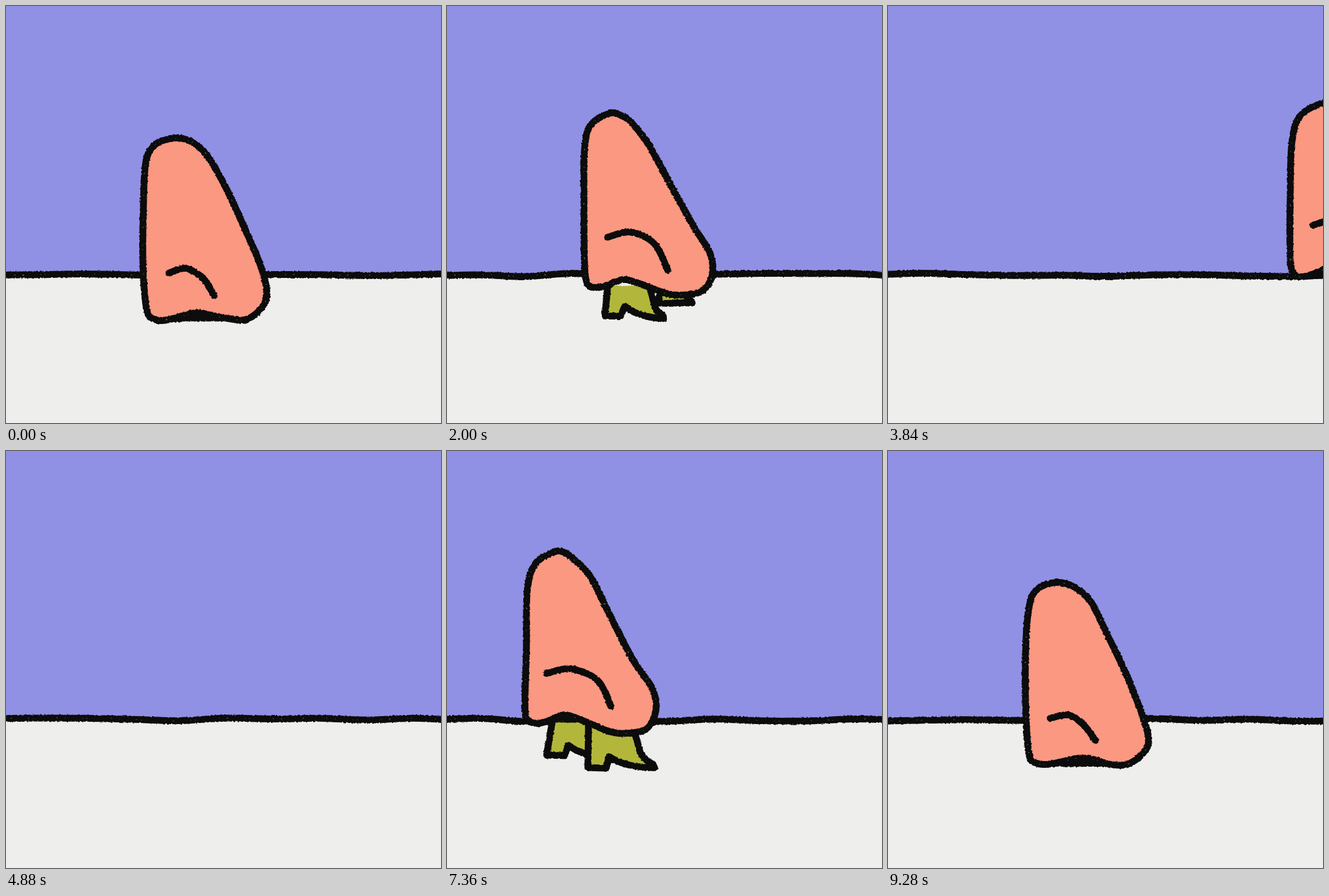
These frames come from a looping animation (764x733 px, 9360 ms). An HTML page:

```html
<!DOCTYPE html>
<html lang="en">
<head>
<meta charset="utf-8">
<title>Walking nose</title>
<style>
  html, body { margin: 0; width: 100%; height: 100%; overflow: hidden; background: #eeeeec; }
  svg { display: block; width: 100%; height: 100%; }
  .ink { stroke: #0c0c0c; stroke-width: 12; stroke-linecap: round; stroke-linejoin: round; fill: none; }
  .boot { fill: #b2b73c; }
  .skin { fill: #fb9881; }
  .speck { fill: none; stroke: #77777c; stroke-width: 1.2; stroke-dasharray: 1 13 2 29 1 7 1 41; }
</style>
</head>
<body>
<svg viewBox="0 0 764 733">
  <defs>
    <filter id="chalk" filterUnits="userSpaceOnUse" x="-20" y="150" width="804" height="430" color-interpolation-filters="sRGB">
      <feTurbulence id="noise" type="fractalNoise" baseFrequency="0.3" numOctaves="1" result="n"/>
      <feDisplacementMap in="SourceGraphic" in2="n" scale="4" xChannelSelector="R" yChannelSelector="G"/>
    </filter>
  </defs>
  <rect width="764" height="733" fill="#eeeeec"/>
  <path id="sky" fill="#9091e4"/>
  <g filter="url(#chalk)">
    <path id="ground" class="ink"/>
    <path id="groundSpeck" class="speck"/>
    <g id="walker">
      <path id="farBoot" class="ink boot"/>
      <path id="nearBoot" class="ink boot"/>
      <path id="nose" class="ink skin"/>
      <path id="noseSpeck" class="speck"/>
      <path id="nostril" class="ink" stroke-width="11"/>
    </g>
  </g>
</svg>
<script>
const LOOP = 9360, STEP = 80;
const LEAVE = 2400, AWAY = 5000, ARRIVE = 7680, SPEED = 0.323, STRIDE = 960;

// Outlines of the nose when seated and when standing, point for point.
const SIT = [[297,231],[262,244],[246,275],[241,350],[242,460],[247,535],[262,550],[285,552],[312,543],[337,538],
  [362,544],[387,550],[420,550],[447,533],[457,505],[446,457],[417,388],[385,320],[356,266],[329,239]];
const STAND = [[292,181],[257,203],[245,250],[242,350],[241,450],[246,478],[261,484],[281,479],[312,470],[355,483],
  [385,497],[415,502],[453,492],[470,460],[463,420],[432,372],[390,295],[355,228],[325,193],[309,184]];
const SIT_CURVE = [[287,468],[318,463],[345,480],[364,508]];
const STAND_CURVE = [[280,394],[322,387],[367,408],[393,455]];

const el = id => document.getElementById(id);
const set = (id, name, value) => el(id).setAttribute(name, value);
const lerp = (a, b, k) => a + (b - a) * k;
const ramp = (t, from, to) => Math.min(1, Math.max(0, (t - from) / (to - from)));
const smooth = p => p * p * (3 - 2 * p);
const fix = p => p.map(v => v.toFixed(1)).join(' ');

function random(seed) {
  let s = (seed + 1) * 2654435761 >>> 0;
  return () => {
    s = (s + 0x6D2B79F5) >>> 0;
    let r = Math.imul(s ^ s >>> 15, s | 1);
    r ^= r + Math.imul(r ^ r >>> 7, r | 61);
    return ((r ^ r >>> 14) >>> 0) / 4294967296;
  };
}

// Catmull-Rom spline through the points.
function spline(pts, closed) {
  const n = pts.length;
  const at = i => closed ? pts[(i + n) % n] : pts[Math.min(n - 1, Math.max(0, i))];
  const handle = (p, a, b, sign) => [p[0] + sign * (b[0] - a[0]) / 6, p[1] + sign * (b[1] - a[1]) / 6];
  let d = 'M' + fix(pts[0]);
  for (let i = 0; i < (closed ? n : n - 1); i++) {
    const a = at(i), b = at(i + 1);
    d += 'C' + [handle(a, at(i - 1), b, 1), handle(b, a, at(i + 2), -1), b].map(fix).join(' ');
  }
  return closed ? d + 'Z' : d;
}

// Heel at (x, y); lean is -1 for a trailing foot and 1 for a leading one.
function boot({ x, y, size, arch, lean, tilt, ankle }, shake) {
  const cos = Math.cos(tilt), sin = Math.sin(tilt);
  const p = (u, v) => fix(shake([x + size * (u * cos - v * sin), y + size * (u * sin + v * cos)], 1));
  const top = u => fix([x + size * u, ankle]);
  return `M${top(5 - 8 * lean)} L${p(0, 0)} L${p(31, 0)} L${p(37, -19 * arch)}`
    + ` Q${p(64, -1)} ${p(116, 0)} L${p(114, -7)} Q${p(97 - 5 * lean, -16)} ${p(95 - 6 * lean, -30)}`
    + ` L${top(88 - 22 * lean)}`;
}

function draw(time) {
  const frame = Math.floor(time % LOOP / STEP), t = frame * STEP;
  const rnd = random(frame);
  const shake = (p, amount) => p.map(v => v + (rnd() * 2 - 1) * amount);

  const rise = smooth(ramp(t, 1640, 2120)) - smooth(ramp(t, 7690, 8190));
  const gait = smooth(ramp(t, 2080, LEAVE)) - smooth(ramp(t, ARRIVE, 7920));
  const leaving = t < AWAY;
  const clock = leaving ? Math.max(0, t - LEAVE) : Math.min(t, ARRIVE) - 6000;
  const shift = SPEED * (leaving ? clock : Math.min(t, ARRIVE) - ARRIVE);
  const phase = clock / STRIDE * Math.PI * 2;
  const swing = Math.sin(phase), pace = t > LEAVE ? Math.cos(phase) : 0;
  const bob = 9 * gait * (1 - Math.abs(swing));

  // Ground
  const line = [];
  for (let x = -30; x <= 800; x += 83) line.push([x, 472.5 + (rnd() - 0.5) * 6]);
  const ground = spline(line);
  set('ground', 'd', ground);
  set('groundSpeck', 'd', ground);
  set('groundSpeck', 'stroke-dashoffset', rnd() * 95);
  set('sky', 'd', ground + 'L800 -10L-30 -10Z');

  // Boots
  const ankle = lerp(545, 482, rise) - bob;
  const foot = (s, c, rest) => {
    const back = Math.max(0, -s) * gait;
    return {
      x: lerp(rest.x, 315 + 72 * s, gait),
      y: lerp(rest.y, rest.floor - 14 * back - 14 * Math.max(0, c), gait),
      size: lerp(rest.size, 1, gait),
      arch: ramp(rise, 0, 0.6) * lerp(rest.arch, 1, gait),
      lean: s * gait,
      tilt: lerp(rest.tilt, 0.14 * back, gait),
      ankle
    };
  };
  const near = foot(swing, pace, { x: 278, y: lerp(549, 543, rise), floor: 557, size: 0.88, arch: 1.1, tilt: 0.07 * rise });
  const far = foot(-swing, -pace, { x: 372, y: 523, floor: 553, size: 0.5, arch: 0, tilt: 0 });
  set('farBoot', 'd', boot(far, shake));
  set('nearBoot', 'd', boot(near, shake));

  // Nose
  const tip = -13 * Math.sin(Math.PI * Math.min(1, rise));
  const pose = (a, b, amount) => a.map((p, i) => {
    const y = lerp(p[1], b[i][1], rise);
    const x = lerp(p[0], b[i][0], rise) + tip * ramp(y, 400, 200);
    return shake([x, y - bob], amount);
  });
  const nose = spline(pose(SIT, STAND, 1.6), true);
  set('nose', 'd', nose);
  set('noseSpeck', 'd', nose);
  set('noseSpeck', 'stroke-dashoffset', rnd() * 95);
  set('nostril', 'd', spline(pose(SIT_CURVE, STAND_CURVE, 2)));
  set('walker', 'transform', `translate(${shift.toFixed(1)} 0)`);
  set('noise', 'seed', frame);
}

let start, shown = -1;
function tick(now) {
  start ??= now;
  const step = Math.floor((now - start) / STEP);
  if (step !== shown) draw(now - start);
  shown = step;
  requestAnimationFrame(tick);
}
draw(0);
requestAnimationFrame(tick);
</script>
</body>
</html>
```
